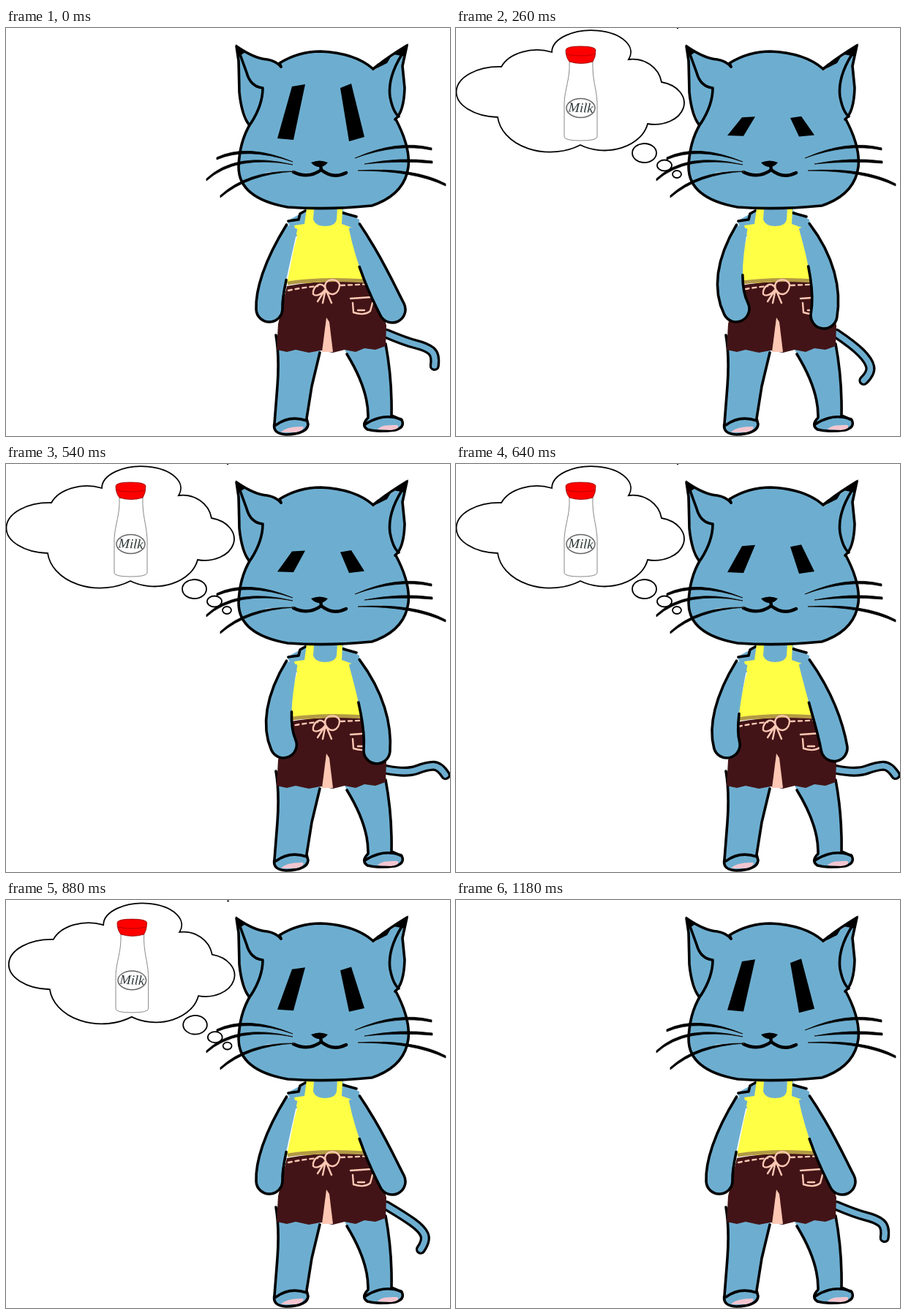
Recreate the animation shown at these times as an HTML page. Size 607 px wide and 558 px high, loop 1.2 s.

```html
<!DOCTYPE html>
<html lang="en">
<head>
<meta charset="utf-8">
<title>Cat thinking of milk</title>
<style>
html, body { margin: 0; width: 100%; height: 100%; overflow: hidden; background: #fff; }
svg { display: block; width: 607px; height: 558px; }
.ink { fill: none; stroke: #000; stroke-width: 3.6; stroke-linecap: round; stroke-linejoin: round; }
.fur { fill: #6daed0; }
.pink { fill: none; stroke: #ffc8b4; stroke-width: 2.4; stroke-linecap: round; stroke-linejoin: round; }
.cloud { fill: #fff; stroke: #000; stroke-width: 1.8; }
.glass { fill: #fff; stroke: #888; }
#tail path { fill: none; stroke-linecap: round; }
</style>
</head>
<body>
<svg viewBox="0 0 607 558">
  <g id="thought">
    <path class="cloud" d="M62 53A52 36 0 0 1 131 33A54 30 0 1 1 236 43A40 38 0 0 1 281 74A40 29 0 0 1 262 131A60 45 0 0 1 170 160A72 53 0 0 1 57 122A59 34.5 0 0 1 62 53Z"/>
    <ellipse class="cloud" cx="257.5" cy="171" rx="16.5" ry="13"/>
    <ellipse class="cloud" cx="285" cy="188" rx="10" ry="7.5"/>
    <ellipse class="cloud" cx="302" cy="200" rx="6" ry="5"/>
    <circle cx="303" cy="0" r="1.2"/>
    <path class="glass" d="M155 46C156 70 149 82 148 102V149Q149 154 170 154Q192 154 193 149V102C192 82 186 70 187 46Z"/>
    <path fill="#f00" stroke="#800" stroke-width=".8" d="M150 30Q151 25 170 25Q190 25 191 30Q191 40 187 46Q171 51 155 46Q150 40 150 30Z"/>
    <path fill="none" stroke="#b00" d="M151 36Q171 40 190 36"/>
    <ellipse cx="170.5" cy="109.5" rx="19.5" ry="13" fill="#fff" stroke="#666" stroke-width="1.5"/>
    <text x="170.5" y="115" text-anchor="middle" font-family="Liberation Serif, serif" font-size="18.5" font-style="italic" fill="#2c3636" transform="rotate(3 170 110)">Milk</text>
  </g>

  <g id="tail">
    <path stroke="#000" stroke-width="14"/>
    <path stroke="#6daed0" stroke-width="7.5"/>
  </g>

  <g id="legs">
    <path class="fur" d="M369 420Q374 450 371 490L367 541Q364 555 383 556Q412 555 413 542L411 534L418 490L430 440Z"/>
    <path class="ink" d="M369 420Q374 450 371 490L367 541Q364 555 383 556Q412 555 413 542L411 534L418 490L429 444M369 543Q388 529 411 537"/>
    <path class="fur" d="M463 440Q496 495 495 533Q485 543 494 549Q508 553 532 550Q546 546 541 536L527 530Q528 480 519 430Z"/>
    <path class="ink" d="M466 446Q496 495 495 533Q485 543 494 549Q508 553 532 550Q546 546 541 536L527 530Q528 480 519 432M491 542Q515 526 540 535"/>
    <path fill="#f3c6d0" d="M376 553Q382 545 406 545Q409 550 396 553ZM508 549Q512 542 535 543Q540 548 526 550Z"/>
  </g>

  <g id="clothes">
    <path class="fur" d="M410 244V250L384 264L396 285H484L483 262L461 250V244Z"/>
    <path class="ink" d="M409 250L402 254L400 262L386 264M461 253L479 258"/>
    <path fill="#ffff46" d="M411 247H421L420 262Q423 271 436 271Q450 271 452 262L453 247H460L459 268L484 277L486 302L499 334L504 349H384L394 300L398 285L394 270L408 268Z"/>
    <path fill="#431417" d="M384 353Q436 343 505 349L520 407L519 435L505 440L490 438L478 443L463 440L447 444L430 441L414 444L396 440L384 443L370 440L372 405Z"/>
    <path fill="none" stroke="#b39a45" stroke-width="5" d="M385 349Q436 341 504 347"/>
    <path fill="#ffc8b4" d="M438 396L442 402L447 443H432Z"/>
    <path class="pink" stroke-dasharray="5 5" d="M386 359Q405 355 426 353M458 352L503 350"/>
    <path class="pink" d="M437 357C432 344 418 354 420 364C424 368 432 364 437 357C432 342 454 341 456 351C456 363 444 370 437 357L426 374M437 357L433 376M437 357L445 376M471 370L500 368M474 376L475 389Q490 394 498 387L501 376M481 386H490"/>
  </g>

  <g id="arms"></g>

  <g id="head">
    <path class="fur" d="M314 24L340 40L374 49Q400 31 430 32Q477 34 503 58L548 24L542 55L546 85L541 112L533 126Q552 160 550 190Q545 230 500 244Q440 248 385 245Q318 233 318 190Q318 155 333 132L322 105L319 70Z"/>
    <path class="ink" d="M376 53L374 48Q400 32 430 32Q477 34 502 56M533 125Q553 163 550 190Q545 228 500 243Q440 249 385 245Q318 233 318 190Q319 156 334 131"/>
    <path class="ink" d="M315 25Q340 42 357 43Q369 45 376 53M315 25L318 45L319 88Q322 118 332 132M317 28L329 61Q334 80 351 82Q351 105 335 130"/>
    <path class="ink" d="M502 56Q520 41 548 24M548 24L542 52L545 82Q544 115 532 125M546 29Q521 65 525 94Q529 115 537 121"/>
    <path d="M314 22L327 33L320 38ZM550 21L530 36L545 39ZM503 57L527 38L521 48Z"/>
    <g id="eyes">
      <path d="M391 80L409 77L393 153L371 151Z"/>
      <path d="M457 82L472 76L490 149L469 155Z"/>
    </g>
    <path d="M417 184Q429 179 440 184Q435 190 429 190Q422 190 417 184Z"/>
    <path class="ink" d="M430 187L431 194M393 197Q413 207 431 194Q447 207 465 198" style="stroke-width:4.5"/>
    <path stroke="#d5e9f2" d="M362 174L392 183M355 182L392 187M355 198L394 196M477 178L508 167M490 186L520 182M481 195L515 194"/>
    <path stroke="#000" stroke-width=".8" d="M288 177Q330 157 392 183Q330 162 288 180ZM274 206Q314 168 392 187Q314 173 274 209ZM293 229Q330 195 394 196Q330 200 293 232ZM582 164Q535 152 477 178Q535 157 582 167ZM583 182Q540 176 490 186Q540 181 583 185ZM601 213Q558 190 481 195Q558 195 601 216Z"/>
  </g>
</svg>
<script>
const LOOP = 1200, STEP = 20, OPEN = 222, SHUT = 1100;
const get = id => document.getElementById(id);
const clamp = v => Math.max(0, Math.min(1, v));
const mix = (a, b, k) => a.map((v, i) => v + (b[i] - v) * k);
// Wave from 0 up to 1, down to -1 and back, in straight lines
const triangle = p => Math.asin(Math.sin(2 * Math.PI * p)) * 2 / Math.PI;

function arm(shoulder, elbow, hand, bentElbow, bentHand) {
  const add = cls => {
    const p = document.createElementNS('http://www.w3.org/2000/svg', 'path');
    p.setAttribute('class', cls);
    return get('arms').appendChild(p);
  };
  return { shoulder, elbow, hand, bentElbow, bentHand, fill: add('fur'), line: add('ink') };
}

const arms = [
  arm([391, 272], [367, 340], [360, 384], [379, 335], [394, 384]),
  arm([476, 271], [504, 335], [528, 385], [499, 338], [491, 397])
];

// A limb that widens from shoulder to a round hand
function drawArm(a, k) {
  const s = a.shoulder, h = mix(a.hand, a.bentHand, k);
  const mid = mix(a.elbow, a.bentElbow, k);
  const c = mid.map((v, i) => 2 * v - (s[i] + h[i]) / 2);
  const left = [], right = [];
  for (let u = 0; u <= 1; u += 0.125) {
    const [x, y] = mix(mix(s, c, u), mix(c, h, u), u);
    const [dx, dy] = s.map((v, i) => (c[i] - v) * (1 - u) + (h[i] - c[i]) * u);
    const r = (18 - 10 * (1 - u) ** 3) / Math.hypot(dx, dy);
    left.push([x - dy * r, y + dx * r]);
    right.unshift([x + dy * r, y - dx * r]);
  }
  const outline = inner => `M${left.join('L')}A18 18 0 0 0 ${inner.join('L')}`;
  a.fill.setAttribute('d', outline(right) + 'Z');
  const isLeft = a === arms[0];
  const half = 5;
  a.line.setAttribute('d', isLeft ? outline(right.slice(0, half))
    : `M${left.slice(half - 2).join('L')}A18 18 0 0 0 ${right.join('L')}`);
}

// Four joints; the swing grows towards the tip
function drawTail(swing) {
  const bones = [[28, 23, .35], [30, 14, 1], [17, 40, 1.2], [15, 98, 1.2]];
  let x = 520, y = 418;
  const pts = [[x, y]];
  for (const [len, rest, gain] of bones) {
    const a = (rest + swing * gain) * Math.PI / 180;
    pts.push([x += len * Math.cos(a), y += len * Math.sin(a)]);
  }
  let d = `M${pts[0]}`;
  for (let i = 1; i < 4; i++) d += `Q${pts[i]} ${i < 3 ? mix(pts[i], pts[i + 1], .5) : pts[4]}`;
  for (const p of get('tail').children) p.setAttribute('d', d);
}

function drawThought(t) {
  const opening = t < LOOP / 2;
  const s = clamp(opening ? t / OPEN : (SHUT - t) / OPEN);
  const x = (opening ? 564 : 372) * (1 - s), y = 149 * (1 - s);
  get('thought').setAttribute('transform', `translate(${x} ${y}) scale(${s})`);
  get('thought').style.display = s ? '' : 'none';
}

function drawEyes(t) {
  const shut = t < 380 ? 1 - (1 - t / 380) ** 1.5 : 1 - Math.min(.92, (t - 380) / 700);
  const lid = 1 - .79 * shut;
  get('eyes').setAttribute('transform', `translate(0 ${145 * (1 - lid)}) scale(1 ${lid})`);
}

function draw(t) {
  drawThought(t);
  drawEyes(t);
  drawTail(46 * triangle(t / 787));
  const bend = clamp(1 - Math.abs(t - 380) / 370);
  for (const a of arms) drawArm(a, bend);
}

function tick() {
  const t = performance.now() % LOOP;
  draw(Math.floor(t / STEP) * STEP);
  requestAnimationFrame(tick);
}
tick();
</script>
</body>
</html>
```
